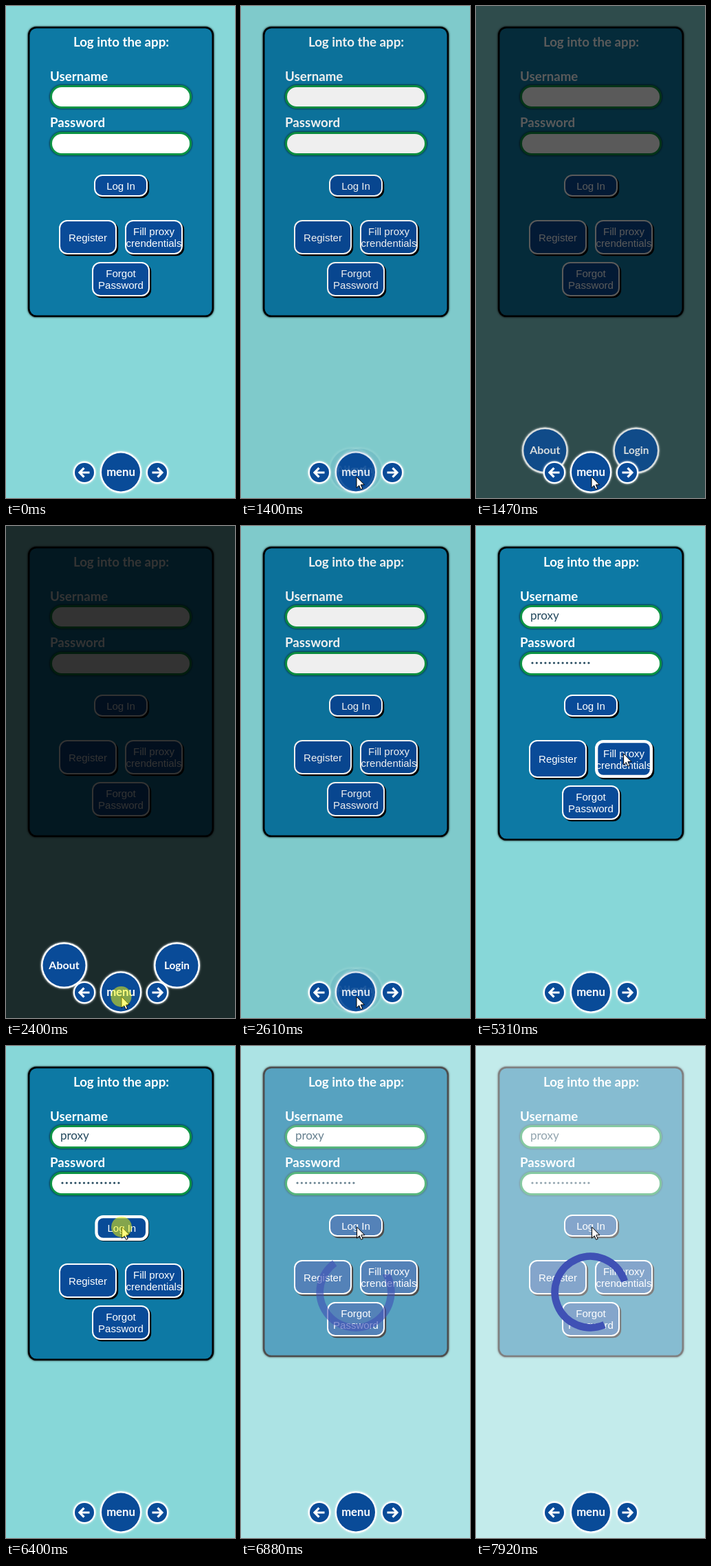
Recreate the animation shown at these times as an HTML page. Size 333 px wide and 715 px high, loop 7990 ms.

```html
<!DOCTYPE html>
<html lang="en">
<head>
<meta charset="utf-8">
<title>Login screen</title>
<style>
  html, body { margin: 0; width: 100%; height: 100%; overflow: hidden; background: #87d7d8; }
  svg { display: block; width: 100%; height: 100%; }
  text { fill: #fff; text-anchor: middle; }
  .hand { font: 700 18.7px Lato, "Open Sans", sans-serif; }
  .plain { font: 15px "Liberation Sans", Arial, sans-serif; }
  .start { text-anchor: start; }
  .typed { font: 400 17px Lato, "Open Sans", sans-serif; fill: #24495e; }
  .blue { fill: #094b98; }
</style>
</head>
<body>
<svg id="stage" viewBox="0 0 333 715" xmlns="http://www.w3.org/2000/svg">
  <defs>
    <filter id="dark" x="-10%" y="-25%" width="120%" height="150%">
      <feDropShadow dx="0" dy="0" stdDeviation="1.7" flood-color="#000"/>
    </filter>
    <filter id="glow" x="-25%" y="-25%" width="150%" height="150%">
      <feDropShadow dx="0" dy="0" stdDeviation="1.8" flood-color="#fff"/>
    </filter>
  </defs>
  <rect width="333" height="715" fill="#87d7d8"/>
  <rect id="card" x="33.2" y="31.2" width="267.6" height="419.6" rx="11" fill="#0879a4" stroke="#000" stroke-width="2.6" filter="url(#dark)"/>
  <text class="hand" x="167.5" y="59">Log into the app:</text>
  <text class="hand start" x="64" y="108.5">Username</text>
  <text class="hand start" x="64" y="175.5">Password</text>
  <g fill="#fff" stroke="#0b9444" stroke-width="3" filter="url(#dark)">
    <rect x="65.5" y="116.5" width="203" height="31" rx="15.5"/>
    <rect x="65.5" y="184.5" width="203" height="31" rx="15.5"/>
  </g>
  <g id="filled">
    <text class="typed start" x="79" y="136">proxy</text>
    <g id="dots" fill="#24495e"></g>
  </g>
  <g id="buttons"></g>
  <rect id="veil" width="333" height="715"/>
  <circle id="spinner" cx="166.5" cy="357.5" r="51.8" fill="none" stroke="#3f51b5" stroke-width="10.6" pathLength="360"/>
  <g id="nav"></g>
  <path id="cursor" d="M0 0V16.3L3.7 12.8L6.1 18.4L8.7 17.3L6.3 11.8H11.4Z" fill="#fff" stroke="#000" stroke-width="1"/>
  <circle id="press" r="15" fill="#ff0" fill-opacity=".5"/>
</svg>
<script>
const LOOP = 7990, SPIN_START = 6548;
const $ = id => document.getElementById(id);

function add(parent, tag, attrs, text) {
  const el = document.createElementNS("http://www.w3.org/2000/svg", tag);
  set(el, attrs);
  if (text) el.textContent = text;
  return parent.appendChild(el);
}
function set(el, attrs) {
  for (const key in attrs) el.setAttribute(key, attrs[key]);
}

const clamp = u => Math.min(1, Math.max(0, u));
const span = (t, a, b) => clamp((t - a) / (b - a));
const smooth = u => u * u * (3 - 2 * u);
const cubic = u => u < .5 ? 4 * u ** 3 : 1 - 4 * (1 - u) ** 3;
const during = (t, a, b) => t >= a && t < b;
const mix = (a, b, u) => a + (b - a) * u;

// cubic-bezier(.35, 0, .25, 1)
function spinEase(x) {
  let lo = 0, hi = 1;
  for (let i = 0; i < 24; i++) {
    const s = (lo + hi) / 2, r = 1 - s;
    if (3 * r * r * s * .35 + 3 * r * s * s * .25 + s ** 3 < x) lo = s; else hi = s;
  }
  return lo * lo * (3 - 2 * lo);
}

function makeButton(x, y, w, h, lines) {
  const g = add($("buttons"), "g", {});
  const shadow = add(g, "rect", { rx: 12 });
  const face = add(g, "rect", { class: "blue", stroke: "#fff" });
  const label = add(g, "g", {});
  lines.forEach((line, i) => add(label, "text", {
    class: "plain", x: x + w / 2, y: y + h / 2 + 5.5 + (i - (lines.length - 1) / 2) * 17
  }, line));

  return ({ shift = 0, grow = 0, hover = 0, active = 0 }) => {
    const border = mix(2, 4.3, hover), height = h + grow;
    const lift = active ? .8 : 2.2;
    set(g, { transform: `translate(${active * 1.3} ${shift + active})` });
    set(shadow, { x: x + lift, y: y + lift, width: w, height });
    set(face, {
      x: x + border / 2, y: y + border / 2, width: w - border, height: height - border,
      rx: 12 - border / 2, "stroke-width": border
    });
    set(label, { transform: `translate(0 ${grow / 2})` });
  };
}

const login = makeButton(128, 245, 78, 32, ["Log In"]);
const register = makeButton(77, 311, 84, 50, ["Register"]);
const fill = makeButton(173, 311, 84, 50, ["Fill proxy", "crendentials"]);
const forgot = makeButton(125, 372, 84, 50, ["Forgot", "Password"]);

for (let i = 0; i < 14; i++) add($("dots"), "circle", { cx: 82 + i * 6.3, cy: 199, r: 1.6 });

function bubble(x, y, r, ring, label, size) {
  const g = add($("nav"), "g", { transform: `translate(${x} ${y})` });
  add(g, "circle", { r: r + ring, fill: "#fff", filter: "url(#glow)" });
  add(g, "circle", { r, class: "blue" });
  if (label) add(g, "text", { class: "hand", y: 5, style: `font-size:${size}px` }, label);
  return g;
}
function arrow(x, dir) {
  add(bubble(x, 678, 14, 2.2), "path", {
    d: "M-.5 -6.6L-7 0L-.5 6.6M-6 0H7.5", transform: `scale(${dir} 1)`,
    fill: "none", stroke: "#fff", "stroke-width": 3.2
  });
}

bubble(167, 677.5, 28, 2.2, "menu", 16.7);
const about = bubble(84.5, 638.5, 31, 2.5, "About", 16);
const enter = bubble(248.5, 638.5, 31, 2.5, "Login", 15.4);
arrow(114, 1);
arrow(220, -1);

// start, end, from, to
const moves = [
  [740, 1370, [342, 560], [168, 684]],
  [2900, 3690, [168, 684], [215.5, 332]],
  [5270, 5780, [215.5, 332], [168.5, 263]]
];
function pointer(t) {
  const [a, b, from, to] = moves.filter((m, i) => !i || t >= m[0]).pop();
  const u = smooth(span(t, a, b));
  return [mix(from[0], to[0], u), mix(from[1], to[1], u)];
}

function drawSpinner(t) {
  const age = Math.max(0, t - SPIN_START);
  const half = Math.floor(age / 500) % 8, shrinking = half % 2;
  const e = spinEase(age % 500 / 500);
  const length = 360 * (shrinking ? .8 - .75 * e : .05 + .75 * e);
  const base = -90 * Math.floor(half / 2) + (shrinking ? 288 - length : 0);
  set($("spinner"), {
    "stroke-dasharray": `${length} ${360 - length}`,
    transform: `rotate(${base - 90 + age * .18} 166.5 357.5)`
  });
}

function draw(t) {
  const open = cubic(span(t, 1350, 1540)) - cubic(span(t, 2450, 2670));
  const loading = smooth(span(t, 6560, 7120));
  const fillHover = smooth(span(t, 3600, 3860)) - smooth(span(t, 5400, 5590));
  const loginHover = smooth(span(t, 5690, 5930)) - smooth(span(t, 6560, 6720));
  const row = 5 * loginHover, stretch = 5 * fillHover;

  login({ hover: loginHover, grow: row, active: +during(t, 6400, 6530) });
  register({ shift: row, grow: stretch });
  fill({ shift: row, grow: stretch, hover: fillHover, active: +during(t, 4650, 4720) });
  forgot({ shift: row + stretch });
  set($("card"), { height: 419.6 + row + stretch });
  set($("filled"), { visibility: t >= 4720 ? "visible" : "hidden" });

  set($("veil"), t < 5000
    ? { fill: "#000", opacity: .8 * open }
    : { fill: "#fff", opacity: .5 * loading });
  set($("spinner"), { opacity: loading });
  drawSpinner(t);

  for (const [item, dx] of [[about, -82.5], [enter, 81.5]])
    set(item, { opacity: open, transform: `translate(${167 + dx * open} ${677.5 - 39 * open})` });

  const [x, y] = pointer(t);
  const pressed = during(t, 2400, 2530) || during(t, 4650, 4720) || during(t, 6400, 6530);
  set($("cursor"), { transform: `translate(${x} ${y})`, visibility: t >= 790 ? "visible" : "hidden" });
  set($("press"), { cx: x - .5, cy: y, visibility: pressed ? "visible" : "hidden" });
}

const origin = performance.now();
function tick() {
  draw((performance.now() - origin) % LOOP);
  requestAnimationFrame(tick);
}
tick();
</script>
</body>
</html>
```
